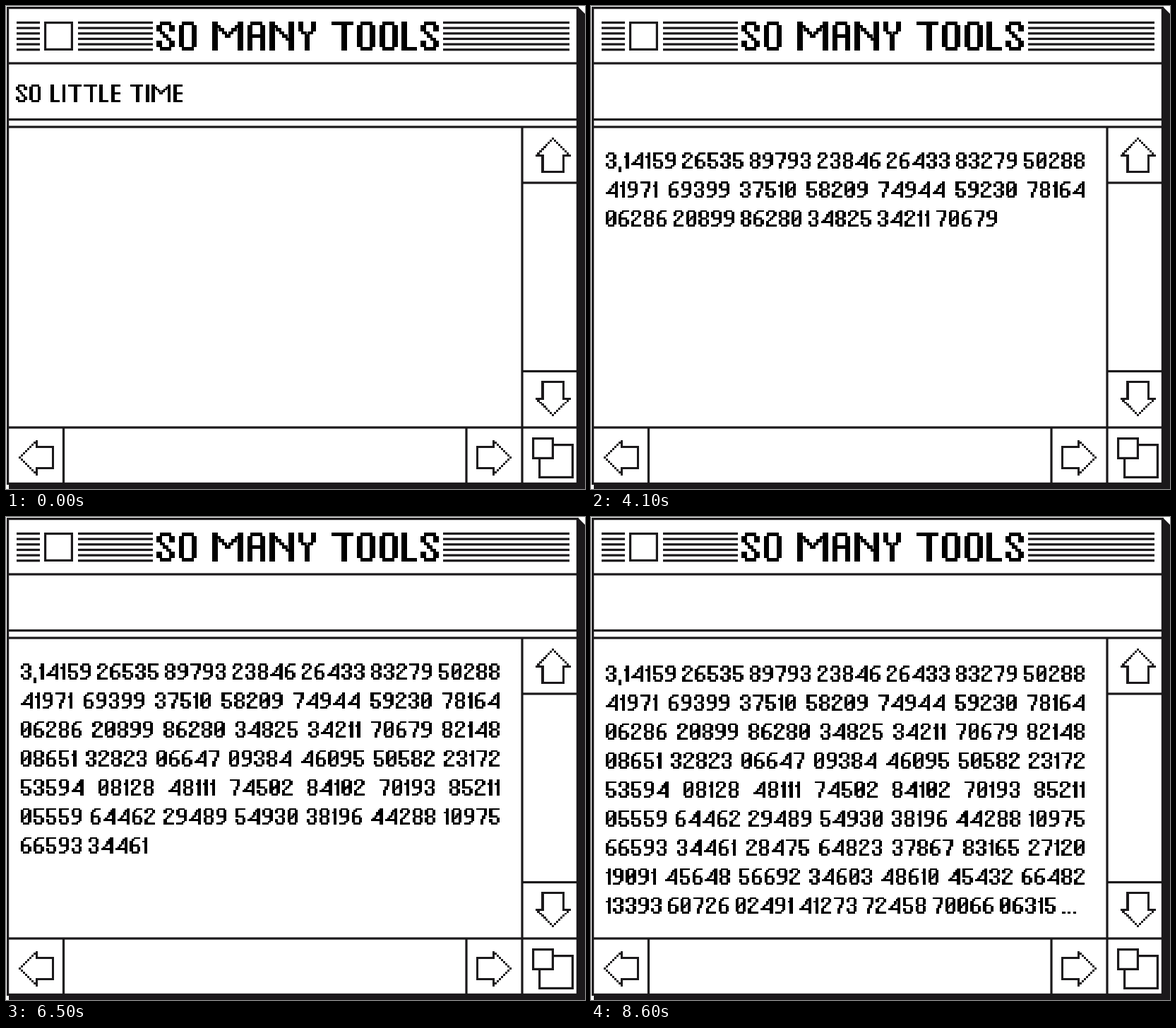
Write an HTML page with a canvas that moves like this. It is 820 by 683 pixels and loops after 9100 ms.

```html
<!DOCTYPE html>
<html lang="en">
<head>
<meta charset="utf-8">
<title>So many tools</title>
<style>
  html, body { margin: 0; width: 100%; height: 100%; overflow: hidden; background: #fff; }
  canvas { display: block; }
</style>
</head>
<body>
<canvas id="stage" width="820" height="683">SO MANY TOOLS</canvas>
<script>
const ctx = document.getElementById('stage').getContext('2d');
const INK = '#1b191b';
const LOOP = 9100;
const PEN = 1.7;
const SPACE = 3.6;

// Each letter is a pen path over a lattice of three columns, named row by row:
// abc def ghi jkl mno. Right-angled corners are cut, capitals keep them sharp.
const PATHS = {
  S: 'fcadlomj', O: 'bcomab', M: 'maHco', A: 'maco,gi', N: 'mal,co', Y: 'adhn,cfh',
  T: 'ac,bn', L: 'aMo', I: 'am', E: 'cAMo,gi',
  0: 'bcomab,fj', 1: 'dco', 2: 'dacfjMo', 3: 'dacih,hiomj', 4: 'oc,cjl', 5: 'cAGiomj',
  6: 'cbdmoig', 7: 'aCfkn', 8: 'bcigab,hiomgh', 9: 'mnlcagi',
  ',': 'mp', '.': 'mm'
};
const WIDTHS = { M: 8, N: 6, T: 5, 4: 5, L: 3, E: 3, 1: 1, I: 0, ',': 0, '.': 0 };
const widthOfGlyph = char => WIDTHS[char] ?? 4;
const advanceOf = char => char === ' ' ? SPACE : widthOfGlyph(char) + 3;

function trace(path, width) {
  const at = name => {
    const index = name.toLowerCase().charCodeAt(0) - 97;
    return [index % 3 * width / 2, Math.floor(index / 3) * 2];
  };
  const toward = (p, q) => p.map((v, i) => v + Math.sign(q[i] - v));
  return [...path].flatMap((name, i) => {
    const p = at(name);
    if (i === 0 || i === path.length - 1 || name < 'a') return [p];
    const prev = at(path[i - 1]), next = at(path[i + 1]);
    const corner = prev[0] === p[0] && next[1] === p[1] || prev[1] === p[1] && next[0] === p[0];
    return corner ? [toward(p, prev), toward(p, next)] : [p];
  });
}
const font = {};
for (const char in PATHS) {
  font[char] = PATHS[char].split(',').map(path => trace(path, widthOfGlyph(char)));
}

// Stamps a pen along a line in whole grid steps.
function plot(points, x, y, unit, penWidth) {
  const stamp = (gx, gy) => {
    const left = Math.round(x + gx * unit), top = Math.round(y + gy * unit);
    ctx.fillRect(left, top,
      Math.round(x + (gx + penWidth) * unit) - left,
      Math.round(y + (gy + 1) * unit) - top);
  };
  for (let i = 1; i < points.length; i++) {
    const [x0, y0] = points[i - 1], [x1, y1] = points[i];
    const steps = Math.ceil(Math.max(Math.abs(x1 - x0), Math.abs(y1 - y0))) || 1;
    for (let k = 0; k <= steps; k++) {
      stamp(Math.round(x0 + (x1 - x0) * k / steps), Math.round(y0 + (y1 - y0) * k / steps));
    }
  }
}

const widthOf = (text, unit) => [...text].reduce((sum, c) => sum + advanceOf(c), 0) * unit;

function write(text, x, y, unit) {
  ctx.fillStyle = '#000';
  for (const char of text) {
    if (char !== ' ') font[char].forEach(line => plot(line, x, y, unit, PEN));
    x += advanceOf(char) * unit;
  }
}

// Machin's formula, 63 groups of five decimals.
function piGroups() {
  const one = 10n ** 325n;
  const arccot = n => {
    let sum = 0n;
    for (let k = 1n, term = one / n; term; k += 2n, term /= n * n) {
      sum += k % 4n === 1n ? term / k : -term / k;
    }
    return sum;
  };
  const digits = String(4n * (4n * arccot(5n) - arccot(239n)));
  const groups = digits.slice(1, 316).match(/.{5}/g);
  groups[0] = '3,' + groups[0];
  return groups;
}
const groups = piGroups();

function bar(x0, y0, x1, y1) {
  ctx.fillStyle = INK;
  ctx.fillRect(x0, y0, x1 - x0, y1 - y0);
}
const across = (y, x0, x1) => bar(x0, y - 1.6, x1, y + 1.6);
const down = (x, y0, y1) => bar(x - 1.6, y0, x + 1.6, y1);

function box(x0, y0, x1, y1) {
  bar(x0, y0, x1, y1);
  ctx.fillStyle = '#fff';
  ctx.fillRect(x0 + 3.2, y0 + 3.2, x1 - x0 - 6.4, y1 - y0 - 6.4);
}

const ARROW = [[8, 0], [0, 8], [3, 8], [3, 16], [13, 16], [13, 8], [16, 8], [8, 0]];
function arrow(x, y, turn) {
  ctx.fillStyle = INK;
  plot(ARROW.map(turn), x, y, 2.95, 1.1);
}

function drawWindow() {
  ctx.fillStyle = '#fff';
  ctx.fillRect(0, 0, 820, 683);
  ctx.fillStyle = INK;
  ctx.beginPath();
  ctx.moveTo(810, 1);
  ctx.lineTo(820, 11);
  ctx.lineTo(820, 683);
  ctx.lineTo(4, 683);
  ctx.lineTo(4, 676);
  ctx.fill();
  box(1, 1, 811, 677);

  for (let i = 0; i < 6; i++) {
    const y = 23.5 + i * 7.65;
    across(y, 15, 48);
    across(y, 102, 208);
    across(y, 619, 798);
  }
  box(54, 22, 95, 63);
  write('SO MANY TOOLS', 213, 22, 4.5);

  [81, 160.5, 171, 596].forEach(y => across(y, 3, 810));
  [250, 516.5].forEach(y => across(y, 731, 810));
  down(731, 171, 676);
  [81.5, 652].forEach(x => down(x, 596, 676));

  arrow(749.5, 186, ([x, y]) => [x, y]);
  arrow(749.5, 530, ([x, y]) => [x, 16 - y]);
  arrow(18, 613.5, ([x, y]) => [y, x]);
  arrow(665.5, 613.5, ([x, y]) => [16 - y, x]);
  box(754, 619, 804, 668);
  box(745, 610, 776, 641);
}

function headline(t) {
  if (t < 1000) return 'SO LITTLE TIME';
  if (t < 2000) return 'SO LITTLE';
  return t < 2200 ? 'SO' : '';
}

function wordsAt(t) {
  if (t < 1000) return [];
  if (t < 1500) return ['3,'];
  if (t < 2000) return ['3,14'];
  if (t < 2400) return groups.slice(0, t < 2200 ? 1 : 2);
  return groups.slice(0, 3 + Math.floor((t - 2400) / 100));
}

// Seven groups a row; every row but the last is justified.
function drawDigits(t) {
  const unit = 2.56, perRow = 7, rowWidth = 678;
  const words = wordsAt(t);
  const left = t < 3400 ? 16 : 21;
  const top = t < 7800 ? 207 : 210;
  for (let i = 0; i < words.length; i += perRow) {
    const row = words.slice(i, i + perRow);
    const widths = row.map(w => widthOf(w, unit));
    const total = widths.reduce((a, b) => a + b, 0) - (3 - PEN) * unit;
    const gap = i + perRow < words.length ? (rowWidth - total) / (perRow - 1) : 6;
    if (i + perRow >= groups.length && t >= 8600) {
      row.push('...');
      widths.push(0);
    }
    let x = left;
    row.forEach((word, k) => {
      write(word, x, top + i / perRow * 16 * unit, unit);
      x += widths[k] + gap;
    });
  }
}

function frame(now) {
  const t = now % LOOP;
  drawWindow();
  write(headline(t), t < 1000 ? 14 : 16, 111, 2.78);
  drawDigits(t);
}

const start = performance.now();
(function tick() {
  frame(performance.now() - start);
  requestAnimationFrame(tick);
})();
</script>
</body>
</html>
```
